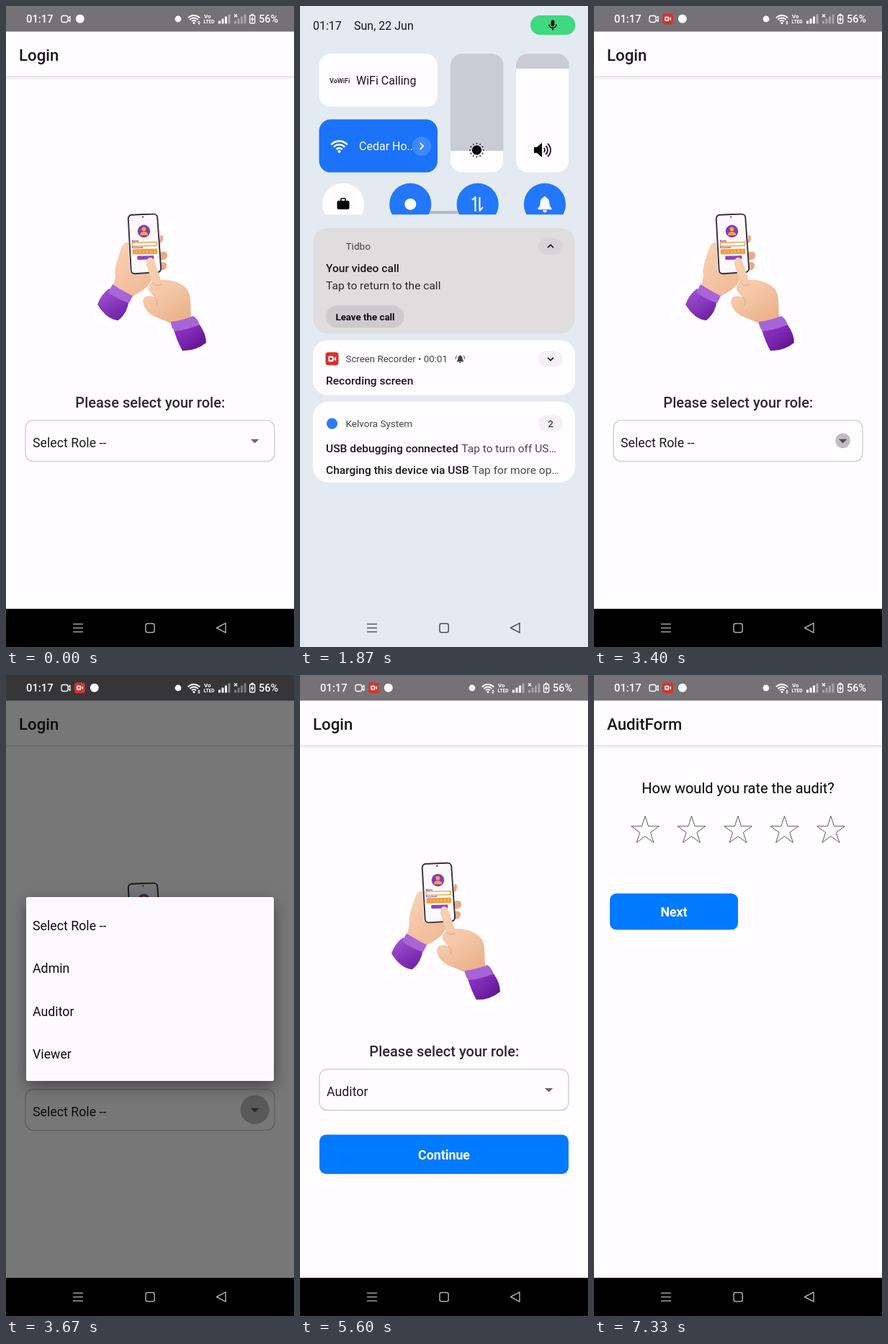
An HTML page with a canvas for the animation above (8 s loop, 400 by 889 pixels).

```html
<!DOCTYPE html>
<html lang="en">
<head>
<meta charset="utf-8">
<title>Role login</title>
<style>
html, body { margin: 0; width: 100%; height: 100%; overflow: hidden; background: #fffdff; }
canvas { display: block; width: 400px; height: 889px; }
</style>
</head>
<body>
<canvas id="stage"></canvas>
<script>
const W = 400, H = 889, LOOP = 8000;
const canvas = document.getElementById('stage');
const c = canvas.getContext('2d');
const dpr = window.devicePixelRatio || 1;
canvas.width = W * dpr;
canvas.height = H * dpr;

const WHITE = '#fffdff', BLUE = '#1b73fa', INK = '#18171a', RED = '#d9302f';
const clamp = v => Math.max(0, Math.min(1, v));
const span = (t, a, b) => clamp((t - a) / (b - a));
const easeOut = k => 1 - (1 - k) * (1 - k);
const mix = (a, b, k) => a + (b - a) * k;

// y is the middle of the capital letters
function text(s, x, y, size, color = INK, weight = 400, align = 'left') {
  c.font = `${weight} ${size}px Roboto, sans-serif`;
  c.textAlign = align;
  c.fillStyle = color;
  c.fillText(s, x, y + size * 0.355);
  return c.measureText(s).width;
}
function fillBox(x, y, w, h, r, color) {
  c.beginPath();
  c.roundRect(x, y, w, h, r);
  c.fillStyle = color;
  c.fill();
}
function strokeBox(x, y, w, h, r, color, width) {
  c.beginPath();
  c.roundRect(x, y, w, h, r);
  c.strokeStyle = color;
  c.lineWidth = width;
  c.stroke();
}
function disc(x, y, r, color) {
  c.beginPath();
  c.arc(x, y, r, 0, 7);
  c.fillStyle = color;
  c.fill();
}
function line(color, width, ...p) {
  c.beginPath();
  for (let i = 0; i < p.length; i += 2) c.lineTo(p[i], p[i + 1]);
  c.strokeStyle = color;
  c.lineWidth = width;
  c.stroke();
}
function shape(d, fill) {
  c.fillStyle = fill;
  c.fill(new Path2D(d));
}
function gradient(x0, y0, x1, y1, ...colors) {
  const g = c.createLinearGradient(x0, y0, x1, y1);
  colors.forEach((col, i) => g.addColorStop(i / (colors.length - 1), col));
  return g;
}
function layer(alpha, draw) {
  if (alpha <= 0) return;
  c.save();
  c.globalAlpha *= alpha;
  draw();
  c.restore();
}
function moved(x, y, draw) {
  c.save();
  c.translate(x, y);
  draw();
  c.restore();
}

function wifi(x, y, r, color) {
  c.strokeStyle = color;
  c.lineWidth = r * 0.17;
  for (const k of [1, 0.68, 0.36]) {
    c.beginPath();
    c.arc(x, y, r * k, -Math.PI * 0.77, -Math.PI * 0.23);
    c.stroke();
  }
  disc(x, y - r * 0.04, r * 0.14, color);
}
function bell(x, y, s, color) {
  moved(x, y, () => {
    c.scale(s, s);
    shape('M-9 5Q-6 3-6-2C-6-7-3-8-2-9Q0-12 2-9C3-8 6-7 6-2Q6 3 9 5V7H-9ZM-3 8H3Q2 11 0 11T-3 8Z', color);
  });
}
function chevron(x, y, dx, dy, color, width) {
  dx ? line(color, width, x - dx, y - dx * 2, x + dx, y, x - dx, y + dx * 2)
     : line(color, width, x - 4, y - dy, x, y + dy, x + 4, y - dy);
}
function recorderIcon(x, y, r) {
  fillBox(x - r, y - r, r * 2, r * 2, r * 0.42, RED);
  fillBox(x - r * 0.58, y - r * 0.42, r * 0.82, r * 0.84, r * 0.15, '#fff');
  shape(`M${x + r * 0.28} ${y}L${x + r * 0.62} ${y - r * 0.38}V${y + r * 0.38}Z`, '#fff');
  disc(x - r * 0.17, y, r * 0.2, RED);
}

function statusIcons(recording) {
  const shift = recording ? 20 : 0;
  text('01:17', 28, 18, 14.8, '#fff', 500);
  c.lineJoin = 'round';
  strokeBox(77, 13.5, 9, 9, 2.5, '#fff', 1.3);
  line('#fff', 1.3, 86, 17, 89, 14.5, 89, 21.5, 86, 19);
  if (recording) recorderIcon(102.5, 17.8, 7.4);
  disc(102.8 + shift, 17.8, 6, '#fff');
  disc(239, 18, 4.4, '#fff');
  wifi(261, 24, 11, '#fff');
  shape('M268 20.5l2 2.2h-4ZM268 26l2-2.2h-4Z', '#fff');
  text('Vo', 275, 14.5, 8, '#fff', 700);
  text('LTED', 274.5, 21.5, 6.6, '#fff', 700);
  for (let i = 0; i < 4; i++) {
    const h = 4 + i * 3;
    fillBox(295 + i * 4.5, 24.5 - h, 3, h, 0.6, i < 3 ? '#fff' : 'rgba(255,255,255,.4)');
    fillBox(317 + i * 4.5, 24.5 - h, 3, h, 0.6, 'rgba(255,255,255,.35)');
  }
  line('#fff', 1.2, 317, 11.5, 321, 15.5);
  line('#fff', 1.2, 321, 11.5, 317, 15.5);
  strokeBox(338.6, 13, 7, 11, 1.4, '#fff', 1.4);
  fillBox(340.5, 10.8, 3.2, 2, 0.5, '#fff');
  shape('M343 13.8l-3.4 5.4h2.2l-.6 4 3.5-5.6h-2.3Z', '#fff');
  text('56%', 351, 18, 14.5, '#fff', 500);
}

function navIcons(color) {
  for (const y of [857.2, 862.6, 868]) line(color, 1.4, 93, y, 107, y);
  strokeBox(194, 856.5, 12.2, 12.2, 2.5, color, 1.5);
  c.lineJoin = 'round';
  c.beginPath();
  c.moveTo(292.5, 862.5);
  c.lineTo(305, 855.8);
  c.lineTo(305, 869.2);
  c.closePath();
  c.stroke();
}

function hands() {
  const skin = gradient(150, 330, 215, 400, '#f9d3b6', '#eeb48e');
  // holding hand
  shape('M214 318q5-1 4 5t-5 6ZM213 342c8-3 12 0 11 5s-6 6-11 5ZM213 356c7-2 11 0 10 5s-5 6-11 5Z', '#eba987');
  shape('M170 328C163 326 160 335 157 345S150 364 152 374L149 388Q157 401 175 403L184 398Q202 388 206 370L172 369Z', skin);
  shape('M143 392L171 407Q169 426 156 436Q140 435 127 414Q132 400 143 392Z',
    gradient(135, 395, 160, 436, '#a04fd0', '#6c1fa4'));
  shape('M148 386Q160 394 176 402L171 412Q153 406 142 397Z', '#a965d8');
  // phone
  c.beginPath();
  c.moveTo(190, 289);
  c.arcTo(210, 288.5, 212, 320, 5);
  c.arcTo(215.5, 369, 195, 370, 5);
  c.arcTo(174, 371.5, 172, 340, 5);
  c.arcTo(169.5, 290, 190, 289, 5);
  c.closePath();
  c.fillStyle = '#fcf9fd';
  c.fill();
  c.strokeStyle = '#33313f';
  c.lineWidth = 1.9;
  c.stroke();
  disc(190.3, 292.5, 1.1, '#33313f');
  disc(191.5, 312.3, 8.7, '#843bb8');
  disc(191.5, 309.5, 3, '#f1a047');
  shape('M186 318q0-5 5.5-5t6 5Z', '#f1a047');
  moved(192, 335, () => {
    c.rotate(-0.025);
    text('Name', -17, -9.5, 3.6, '#6a2a9a', 700);
    strokeBox(-16.5, -7.2, 34, 5, 0.8, '#f0a040', 1.4);
    text('Password', -17, -0.3, 3.4, '#6a2a9a', 700);
    fillBox(-16.5, 2, 34.5, 7.2, 1, '#f0a040');
    for (let i = 0; i < 6; i++) disc(-11 + i * 5, 5.6, 0.9, '#f8d08e');
    fillBox(-10, 11.5, 23, 5.2, 1, '#8b45bd');
  });
  // tapping hand
  shape('M196 352C198 347 204 348 206 354L215 380Q224 379 234 382C246 386 255 392 256 406L257 432L230 441C219 434 203 432 196 423C189 415 188 405 195 403Q201 401 206 404L198 394Q197 386 203 383L196 362Q194 356 196 352Z',
    gradient(195, 355, 245, 435, '#f8d0b2', '#f5c8a7', '#eab18b'));
  c.strokeStyle = 'rgba(206,132,98,.55)';
  c.lineWidth = 1;
  c.stroke(new Path2D('M203 383Q207 390 216 386M206 404Q212 408 209 415'));
  shape('M233 449L269 442Q278 455 278 467Q263 479 245 478Q238 466 233 449Z',
    gradient(235, 445, 262, 480, '#8e35c2', '#7c27b1', '#60168f'));
  shape('M229 438Q245 436 260 430Q265 432 269 442Q253 449 234 451Q229 445 229 438Z', '#a764d7');
}

function header(title) {
  c.fillStyle = WHITE;
  c.fillRect(0, 35, W, 800);
  c.fillStyle = gradient(0, 96, 0, 103, '#dddbdf', '#f2f0f3', WHITE);
  c.fillRect(0, 97, W, 6);
  text(title, 18, 68, 22.2, INK, 500);
}
function bluButton(x, y, w, h, label) {
  fillBox(x, y, w, h, 9, '#007aff');
  text(label, x + w / 2, y + h / 2 + 0.7, 17.8, '#fff', 600, 'center');
}

function loginScreen(t) {
  const chosen = t >= 5400;
  header('Login');
  moved(0, chosen ? -27.8 : 0, () => {
    hands();
    text('Please select your role:', 200.3, 550, 20, '#2b292e', 500, 'center');
    strokeBox(27, 574.5, 346, 57, 11, '#c9c7cf', 1.2);
    text(chosen ? 'Auditor' : 'Select Role --', 37, 605.5, 17.8, '#1d1b20');
    shape('M339.8 600.8H351.4L345.6 606.4Z', '#6a686c');
    if (t >= 3370 && !chosen) {
      disc(345.6, 602.8, mix(6, 20, easeOut(span(t, 3370, 3550))), 'rgba(0,0,0,.25)');
    }
  });
  if (chosen) {
    layer(1 - 0.8 * span(t, 6500, 6650) + 0.8 * span(t, 6680, 6900),
      () => bluButton(27, 637.5, 346, 54.5, 'Continue'));
  }
}

function star(x, y, r) {
  c.beginPath();
  for (let i = 0; i < 10; i++) {
    const a = -Math.PI / 2 + i * Math.PI / 5, q = i % 2 ? r * 0.382 : r;
    c.lineTo(x + q * Math.cos(a), y + q * Math.sin(a));
  }
  c.closePath();
  c.lineJoin = 'miter';
  c.strokeStyle = '#333';
  c.lineWidth = 0.8;
  c.stroke();
}
function auditScreen() {
  header('AuditForm');
  text('How would you rate the audit?', 200, 157, 20, '#050505', 400, 'center');
  for (let i = 0; i < 5; i++) star(71 + i * 64.5, 216, 20.3);
  bluButton(22, 303, 178, 50.3, 'Next');
}

function roleDialog(t) {
  const show = span(t, 3500, 3660) * (1 - span(t, 5380, 5590));
  layer(show, () => {
    c.fillStyle = 'rgba(0,0,0,.53)';
    c.fillRect(0, 0, W, 836);
    c.save();
    c.shadowColor = 'rgba(0,0,0,.4)';
    c.shadowBlur = 22 * dpr;
    c.shadowOffsetY = 8 * dpr;
    fillBox(28, 308, 344, 255, 2.5, '#fcfaff');
    c.restore();
    layer(span(t, 5230, 5330), () => {
      c.fillStyle = 'rgba(0,0,0,.12)';
      c.fillRect(28, 436, 344, 60);
    });
    ['Select Role --', 'Admin', 'Auditor', 'Viewer'].forEach((s, i) =>
      text(s, 37, 347.3 + i * 59.5, 17.8, '#0b0a0c'));
  });
}

function slider(x, level) {
  c.save();
  c.beginPath();
  c.roundRect(x, 75.5, 73.5, 164.5, 16);
  c.clip();
  c.fillStyle = '#c9cbd5';
  c.fillRect(x, 75, 74, 166);
  c.fillStyle = WHITE;
  c.fillRect(x, level, 74, 241 - level);
  c.restore();
}
function quickTiles(d) {
  moved(0, -d / 6, () => {
    fillBox(26.5, 75.5, 164.5, 73.5, 16, WHITE);
    text('VoWiFi', 41, 112.5, 9, INK, 500);
    text('WiFi Calling', 78, 112.5, 16);
    fillBox(26.5, 166.5, 164.5, 73.5, 16, BLUE);
    wifi(54.5, 211.5, 15, '#fff');
    text('Cedar Ho..', 82, 203.5, 16, '#fff');
    disc(169, 203.5, 13.2, '#3d8afc');
    chevron(169, 203.5, 2.2, 0, '#fff', 2);
    slider(209, 210);
    disc(245.5, 209, 6.6, '#050505');
    for (let i = 0; i < 12; i++) {
      const a = i * Math.PI / 6;
      disc(245.5 + 9.3 * Math.cos(a), 209 + 9.3 * Math.sin(a), 0.9, '#050505');
    }
    slider(300, 96);
    shape('M325 205h4l7-6v20l-7-6h-4Z', '#050505');
    c.strokeStyle = '#050505';
    c.lineWidth = 1.7;
    for (const r of [4, 8, 12]) {
      c.beginPath();
      c.arc(336, 209, r, -0.85, 0.85);
      c.stroke();
    }
  });
  fillBox(173, 339 - d, 54, 4.2, 2, '#b8b9bd');
  moved(0, -d * 0.22, () => {
    [60, 153.3, 246.7, 340].forEach((x, i) => disc(x, 287, 29.1, i ? '#2377fb' : WHITE));
    fillBox(51.5, 282, 17, 12, 2, '#050505');
    strokeBox(56.8, 279, 6.4, 5, 1, '#050505', 1.6);
    disc(153.3, 287, 8, '#fff');
    line('#fff', 2.1, 239, 281, 243.5, 277.5, 243.5, 297);
    line('#fff', 2.1, 249.5, 277, 249.5, 296, 254, 291);
    bell(340, 287, 1.05, '#fff');
  });
}

function twoPart(bold, rest, y) {
  const w = text(bold, 36, y, 15.55, INK, 500);
  text(rest, 36 + w + 4.5, y, 15.55, '#48464b');
}
function notifications(t, d) {
  const squeeze = clamp(d / 54);
  const top = 363 - d, callHeight = 160 - 13.5 * squeeze;
  const second = top + callHeight + 9;
  const push = easeOut(span(t, 600, 930));
  const third = second + push * (95 - 10 * squeeze);

  moved(0, top, () => {
    fillBox(18, 0, 364, callHeight, 21, '#e0dddf');
    text('Tidbo', 63.5, 25, 13.6, '#454347');
    fillBox(331, 14, 34, 22.5, 11, '#d6d4d6');
    chevron(348, 25, 0, -2, INK, 1.6);
    text('Your video call', 36, 55.5, 15.55, INK, 500);
    text('Tap to return to the call', 36, 79.5, 15.55, '#2d2b2f');
    fillBox(36, 107, 108.5, 31, 15.5, '#cdcbce');
    text('Leave the call', 90.5, 122.7, 13.3, '#0b0a0c', 700, 'center');
  });

  layer(span(t, 900, 1200), () => moved(0, second, () => {
    fillBox(18, 0, 364, 86 - 10 * squeeze, 20, WHITE);
    recorderIcon(44.5, 25.7, 9);
    text(`Screen Recorder • 00:0${t < 1470 ? 0 : 1}`, 63.5, 25.5, 13.3, '#454347');
    bell(222.5, 26, 0.52, '#454347');
    line('#454347', 1, 216, 26, 217.5, 21);
    line('#454347', 1, 229, 26, 227.5, 21);
    fillBox(331, 14.5, 34, 22.5, 11, '#f3f1f4');
    chevron(348, 26, 0, 2, INK, 1.6);
    text('Recording screen', 36, 56, 15.55, INK, 500);
  }));

  moved(0, third, () => {
    fillBox(18, 0, 364, 123 - 11 * squeeze, 21, WHITE);
    moved(0, -squeeze, () => {
      disc(44.5, 31.5, 7.6, '#2b7bf3');
      text('Kelvora System', 63.5, 31.5, 13.5, '#454347');
      fillBox(331, 20, 34, 22.5, 11, '#f3f1f4');
      text('2', 348, 31.5, 13.5, INK, 400, 'center');
      twoPart('USB debugging connected', 'Tap to turn off US…', 65.5);
      twoPart('Charging this device via USB', 'Tap for more op…', 95.5);
    });
  });
}

function shade(t) {
  const opening = 300 * (1 - easeOut(span(t, 40, 600)));
  const closing = 360 * Math.pow(span(t, 1770, 2150), 1.42);
  const d = opening + closing;
  const alpha = span(t, 50, 330) * (1 - span(t, 1930, 2220));
  layer(alpha, () => {
    c.fillStyle = '#e4eaf2';
    c.fillRect(0, 0, W, H);
    text('01:17', 18, 27.5, 16);
    text('Sun, 22 Jun', 75, 27.5, 16);
    fillBox(320, 13, 62.5, 27, 13.5, '#3fd981');
    fillBox(348.6, 19.5, 4.8, 9, 2.4, '#050505');
    c.strokeStyle = '#050505';
    c.lineWidth = 1.4;
    c.stroke(new Path2D('M346 25.5a5 5 0 0 0 10 0M351 30.5V34'));
    navIcons('#4c4e54');
  });
  layer(alpha * span(t, 130, 470), () => {
    c.save();
    c.beginPath();
    c.rect(0, 42, W, Math.max(0, (d > 0 ? 344 : 360) - d - 42));
    c.clip();
    quickTiles(d);
    c.restore();
    notifications(t, d);
  });
}

function draw(t) {
  c.setTransform(dpr, 0, 0, dpr, 0, 0);
  c.fillStyle = WHITE;
  c.fillRect(0, 0, W, H);

  loginScreen(t);
  const enter = easeOut(span(t, 6820, 7200));
  layer(span(t, 6860, 6990), () => {
    const s = mix(0.88, 1, enter);
    c.beginPath();
    c.rect(0, 35, W, 801);
    c.clip();
    c.fillStyle = WHITE;
    c.fillRect(0, 35, W, 801);
    c.translate(200, 435);
    c.scale(s, s);
    c.translate(-200, -435);
    auditScreen();
  });

  c.fillStyle = '#747276';
  c.fillRect(0, 0, W, 35.5);
  const icons = t < 1500 ? 1 - span(t, 60, 250) : span(t, 2320, 2600);
  roleDialog(t);
  layer(icons, () => statusIcons(t > 1500));

  c.fillStyle = '#000';
  c.fillRect(0, 836, W, 53);
  navIcons('#aaa9ab');
  shade(t);
}

const start = performance.now();
function tick() {
  draw((performance.now() - start) % LOOP);
  requestAnimationFrame(tick);
}
tick();
</script>
</body>
</html>
```
